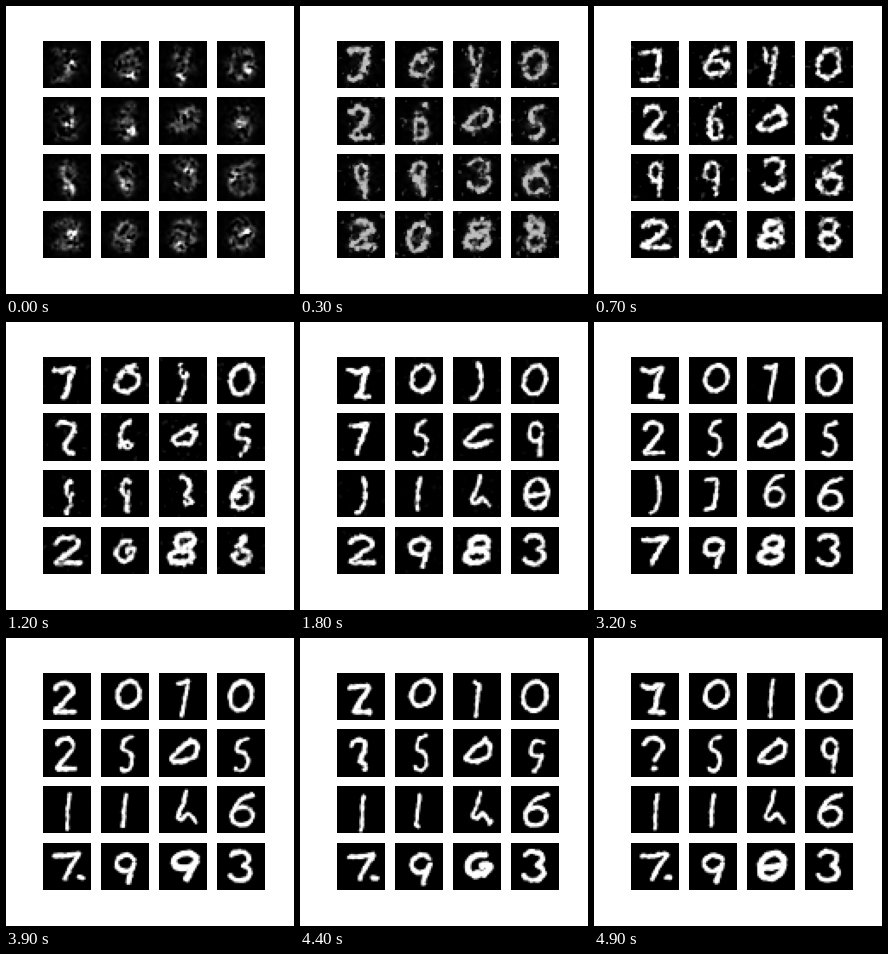
A matplotlib script for the animation above (5100 ms loop, 288 px wide and 288 px high).

```python
import numpy as np
import matplotlib.pyplot as plt
from matplotlib.animation import FuncAnimation

STEP = 100                      # ms per frame
FRAMES = 51
KEYS = np.array([0, 700, 1800, 2600, 3200, 3900, 4900])
CELLS = 28
SAMPLES = 48
Y, X = np.mgrid[:CELLS, :CELLS]


def line(*xy):
    return np.array(xy, float).reshape(-1, 2)


def arc(x, y, rx, ry, start, stop):
    a = np.radians(np.linspace(start, stop, 24))
    return np.stack([x + rx * np.cos(a), y + ry * np.sin(a)], -1)


def join(*parts):
    return np.vstack(parts)


# Handwritten forms in a unit box, y pointing down.
ring = arc(.5, .5, .5, .5, -90, -450)
seven = line(0, .1, .45, .12, 1, 0, .65, .5, .4, 1)
GLYPHS = {
    "0": ring,
    "1": line(.65, 0, .5, .4, .45, 1),
    ")": arc(0, .4, .85, .6, -45, 90),
    "J": line(0, .05, .9, 0, .65, .95, .05, 1),
    "I": line(0, .08, .4, .2, 1, 0, .7, .45, .65, .9, .3, 1, 1, 1),
    "2": join(arc(.5, .27, .45, .27, 190, 370), line(0, 1, 1, .98)),
    "3": join(arc(.45, .24, .5, .24, 200, 430), arc(.45, .73, .55, .27, -80, 160)),
    "4": line(0, 0, .1, .42, .6, .45, 1, 0, .75, .5, .35, 1),
    "5": join(line(1, 0, .25, .1, .1, .38), arc(.4, .7, .55, .3, -70, 130)),
    "6": join(line(.95, 0, .35, .15), arc(.5, .7, .5, .3, 200, -160)),
    "7": seven,
    "8": join(arc(.5, .25, .4, .25, 90, -270), arc(.5, .75, .5, .25, -90, 270)),
    "9": join(arc(.5, .3, .5, .3, -20, -370), line(.85, .6, .75, 1)),
    "?": join(arc(.5, .25, .5, .25, 190, 390), line(.55, .72)),
    "a": line(.8, 0, .3, .45, 0, .9, .4, 1, .95, .7, 1, .15, .75, 0),
    "c": line(1, .1, .6, .1, .25, .5, 0, .85, .4, 1, .95, .75),
    "h": line(.5, 0, .35, .4, 0, .85, .25, .95, .6, .7, 1, 1),
    "z": seven,
    "e": ring,
}
EXTRAS = {
    "?": line(.5, .97, .6, .97),
    "z": line(.95, .92, 1.1, .95),
    "e": line(.15, .58, .85, .5),
}


def resample(points):
    """Even spacing along the path, then rounded corners."""
    length = np.r_[0, np.cumsum(np.hypot(*np.diff(points, axis=0).T))]
    s = np.linspace(0, length[-1], SAMPLES)
    path = np.stack([np.interp(s, length, points[:, k]) for k in (0, 1)], -1)
    padded = np.pad(path, ((2, 2), (0, 0)), mode="edge")
    return sum(padded[i:i + SAMPLES] for i in range(5)) / 5


def pose(name, box, slant):
    x0, y0, x1, y1 = box
    main = GLYPHS[name]
    extra = EXTRAS.get(name, np.repeat(main[-1:], 2, axis=0))

    def place(p):
        x = x0 + (x1 - x0) * (p[:, 0] + slant * (.5 - p[:, 1]))
        return resample(np.stack([x, y0 + (y1 - y0) * p[:, 1]], -1))

    return np.vstack([place(main), place(extra)])


tiles = []


def tile(names, box, hot, slant=0., width=1.35):
    """One sample: its form at each key time, its box and first bright spot."""
    tiles.append(([pose(n, box, slant) for n in names], hot, width))


tile("JI7I2I", (6, 6, 18, 23), (15, 13), width=1.5)
tile("600000", (9, 5, 22, 20), (17, 20), .15)
tile("4)7771", (10, 4, 17, 25), (12, 20), width=1.15)
tile("000000", (7, 5, 20, 22), (18, 16), .15)
tile("27722?", (7, 5, 18, 23), (15, 15))
tile("655555", (11, 4, 18, 24), (17, 20), width=1.15)
tile("accaaa", (6, 6, 22, 19), (14, 12), width=1.45)
tile("595559", (10, 5, 18, 24), (13, 15), width=1.2)
tile("9)9)11", (11, 5, 17, 25), (15, 20), width=1.1)
tile("91JJ11", (9, 5, 17, 23), (14, 18), width=1.2)
tile("3h66hh", (10, 3, 21, 21), (16, 9), width=1.2)
tile("6e6666", (8, 5, 21, 23), (10, 12), .1)
tile("2277zz", (6, 6, 21, 21), (17, 14), width=1.4)
tile("099999", (8, 7, 19, 23), (15, 16), .15, 1.45)
tile("88889e", (7, 6, 21, 21), (12, 20), .25, 1.9)
tile("833333", (8, 5, 19, 22), (18, 13), width=1.45)


def smooth(x):
    x = np.clip(x, 0, 1)
    return x * x * (3 - 2 * x)


def cloud(rng):
    """Soft random field with unit spread."""
    n = rng.normal(size=(CELLS, CELLS))
    for axis in (0, 1):
        n = (np.roll(n, 1, axis) + 2 * n + np.roll(n, -1, axis)) / 4
    return n / n.std()


def distance(points):
    px, py = points.T[:, :, None, None]
    return np.sqrt(((X - px) ** 2 + (Y - py) ** 2).min(0))


def smear(index):
    """Untrained output: a bright spot and faint blotches."""
    poses, (hx, hy), _ = tiles[index]
    rng = np.random.default_rng(100 + index)
    speckle = np.clip(.45 + .35 * cloud(rng), 0, 1.2)
    spot = np.exp(-((X - hx) ** 2 + (Y - hy) ** 2) / 9)
    trail = np.exp(-(distance(poses[0]) / 2) ** 2)
    haze = np.exp(-((X - 14) ** 2 + (Y - 14) ** 2) / 90)
    return np.clip(speckle * (1.2 * spot + .4 * trail + .15 * haze), 0, 1)


def wobble(points, rng, amount):
    s = np.linspace(0, 2, len(points))[:, None]
    shift, bend = rng.normal(0, .3, 2), rng.normal(0, .4, 2)
    return points + amount * (shift + bend * np.sin(5 * s + rng.uniform(0, 6)))


def sample(index, frame):
    t = min(frame, FRAMES - 2) * STEP
    poses, _, width = tiles[index]
    k = min(np.searchsorted(KEYS, t, side="right") - 1, len(KEYS) - 2)
    u = (t - KEYS[k]) / (KEYS[k + 1] - KEYS[k])
    rng = np.random.default_rng(1000 * index + frame)
    start, end = poses[max(k - 1, 0)], poses[k]
    points = wobble(start + smooth(u) * (end - start), rng, np.sin(np.pi * u))

    raw = np.exp(-t / 900)                 # how untrained the output still is
    edge = width + (.2 + .7 * raw) * cloud(rng) - distance(points)
    ink = smooth(.5 + edge / (1.3 + 1.5 * raw)) * smooth(t / 450)
    stray = .35 * raw * np.clip(cloud(rng) - 1.6, 0, 1) * smooth(t / 300)
    return np.clip(np.maximum(ink, smear(index) * np.clip(1 - t / 600, 0, 1)) + stray, 0, 1)


fig = plt.figure(figsize=(4, 4), dpi=72, facecolor="white")
fig.subplots_adjust(left=.125, right=.9, bottom=.125, top=.88, wspace=.2, hspace=.2)
pictures = []
for i in range(len(tiles)):
    ax = fig.add_subplot(4, 4, i + 1)
    ax.axis("off")
    pictures.append(ax.imshow(sample(i, 0), cmap="gray", vmin=0, vmax=1))


def update(frame):
    for i, picture in enumerate(pictures):
        picture.set_data(sample(i, frame))
    return pictures


anim = FuncAnimation(fig, update, frames=FRAMES, interval=STEP, repeat=True, repeat_delay=0)
plt.show()
```
